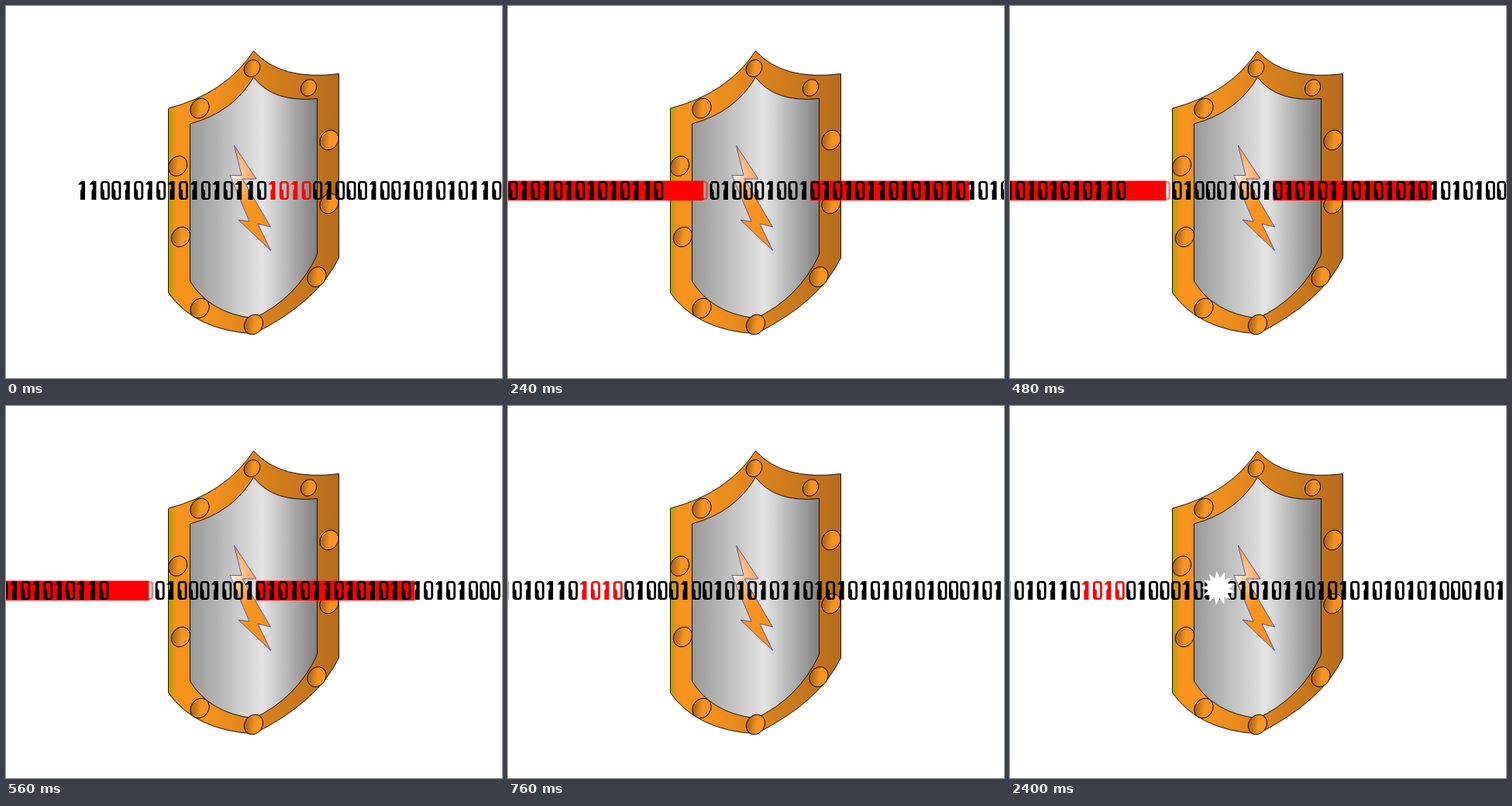
Recreate the animation shown at these times as an HTML page. Size 640 px wide and 480 px high, loop 4840 ms.

```html
<!DOCTYPE html>
<html lang="en">
<head>
<meta charset="utf-8">
<title>Shield and binary stream</title>
<style>
  html, body { margin: 0; width: 100%; height: 100%; overflow: hidden; background: #fff; }
  svg { display: block; width: 100vw; height: 100vh; }
</style>
</head>
<body>
<svg viewBox="0 0 640 480" role="img" aria-label="A shield with a lightning bolt and a stream of binary digits">
  <defs>
    <linearGradient id="rim" gradientUnits="userSpaceOnUse" x1="209" y1="0" x2="430" y2="0">
      <stop offset="0" stop-color="#c49c00"/>
      <stop offset=".025" stop-color="#d09a08"/>
      <stop offset=".045" stop-color="#f7931e"/>
      <stop offset=".2" stop-color="#f7931e"/>
      <stop offset="1" stop-color="#b56c1c"/>
    </linearGradient>
    <linearGradient id="steel" gradientUnits="userSpaceOnUse" x1="238" y1="0" x2="401" y2="0">
      <stop offset="0" stop-color="#999"/>
      <stop offset=".57" stop-color="#e4e4e4"/>
      <stop offset="1" stop-color="#808080"/>
    </linearGradient>
    <linearGradient id="stud" gradientTransform="rotate(-35 .5 .5)">
      <stop offset="0" stop-color="#b0691c"/>
      <stop offset=".15" stop-color="#b56c1c"/>
      <stop offset=".55" stop-color="#f7931e"/>
    </linearGradient>
    <radialGradient id="glow" gradientUnits="userSpaceOnUse" cx="289" cy="218" r="48">
      <stop offset="0" stop-color="#fff"/>
      <stop offset=".4" stop-color="#fbc084"/>
      <stop offset=".75" stop-color="#f8a03c"/>
      <stop offset="1" stop-color="#f7931e"/>
    </radialGradient>
    <path id="d1" d="M1 4.5L5 0H10V24H4V12L5.500 10V4.500Z"/>
    <path id="d0" fill-rule="evenodd" d="M5 0H9Q13 0 13 4.500V19.500Q13 24 9 24H5Q1 24 1 19.500V4.500Q1 0 5 0Z
      M5.500 2.200Q4 2.200 4 4V10L6 12V20Q6 21.800 7.500 21.800H8.500Q10.200 21.800 10.200 20V4Q10.200 2.200 8.500 2.200Z"/>
  </defs>
  <g stroke="#000" stroke-width=".9">
    <path fill="url(#rim)" d="M209.500 132Q283 113 319.500 58Q355 97 429.500 87.500V325Q402 382 319.500 423Q243 418 209.500 370Z"/>
    <path fill="url(#steel)" d="M237.500 152Q293 137 319.500 92Q344 125 401.500 119.500V321Q375 377 319.500 403Q262 396 237.500 355Z"/>
    <g id="studs" fill="url(#stud)"></g>
  </g>
  <path fill="url(#glow)" stroke="#4038b0" stroke-width=".8"
    d="M294.500 180L323 223H305L341.500 285L325 281L341.500 315.500L300 276L314 278L289 218.500H304Z"/>
  <g id="stream">
    <g id="bars" fill="#f00">
      <rect x="-2" y="225.500" width="298" height="25.500"/>
      <rect x="434" y="225.500" width="205" height="25.500"/>
    </g>
    <g id="digits"></g>
  </g>
  <path id="star" fill="#fff"/>
</svg>
<script>
const NS = 'http://www.w3.org/2000/svg';
const $ = id => document.getElementById(id);

function add(parent, tag, attrs) {
  const el = document.createElementNS(NS, tag);
  for (const key in attrs) el.setAttribute(key, attrs[key]);
  return parent.appendChild(el);
}

// Studs: centre x, centre y, radius
[[317.5, 80.5, 10.5], [390.5, 105.5, 10.3], [250, 132, 12.3], [417, 173, 12.3],
 [417, 255, 12.3], [221.5, 206.5, 12.3], [225.5, 298, 12.3], [250, 390, 12.3],
 [401, 349.5, 12.3], [319.5, 411, 12.3]].forEach(([x, y, r]) =>
  add($('studs'), 'ellipse', {
    rx: r * 0.93, ry: r * 1.1, transform: `translate(${x} ${y}) rotate(35)`
  }));

// Digit runs
const PITCH = 14.44;
let column = 0;
function addRun(text, color) {
  const run = add($('digits'), 'g', { fill: color });
  for (const digit of text) {
    add(run, 'use', { href: '#d' + digit, x: column++ * PITCH, y: 226 });
  }
  return run;
}
addRun('11001010101010110', '#000');
const marked = addRun('1010', '#f00');
addRun('0100010010101011010101010101000101', '#000');

// Star with 13 spikes around the origin
const SPIKES = 13;
const points = Array.from({ length: SPIKES * 2 }, (_, i) => {
  const angle = i * Math.PI / SPIKES - 0.1;
  const r = i % 2 ? 13.5 : 22;
  return `${(r * Math.sin(angle)).toFixed(2)} ${(-r * Math.cos(angle)).toFixed(2)}`;
});
$('star').setAttribute('d', `M${points.join('L')}Z`);

const LOOP = 4840, TICK = 40, LAST = 19;
const START_X = 92, END_X = -154, SPEED = 246 / 29;

function render(time) {
  const t = time % LOOP;
  const tick = Math.min(LAST, Math.floor(t / TICK));
  const moving = tick > 0 && tick < LAST;
  const x = tick ? END_X + (LAST - tick) * SPEED : START_X;

  $('stream').setAttribute('transform', `translate(${x.toFixed(2)} 0)`);
  $('bars').style.display = moving ? '' : 'none';
  marked.setAttribute('opacity', moving ? 0.5 : 1);

  $('star').style.display = t < 2320 ? 'none' : '';
  $('star').setAttribute('transform', t < 2400 ? 'translate(350 196)' : 'translate(269 235)');
}

const begin = performance.now();
function loop() {
  render(performance.now() - begin);
  requestAnimationFrame(loop);
}
loop();
</script>
</body>
</html>
```
